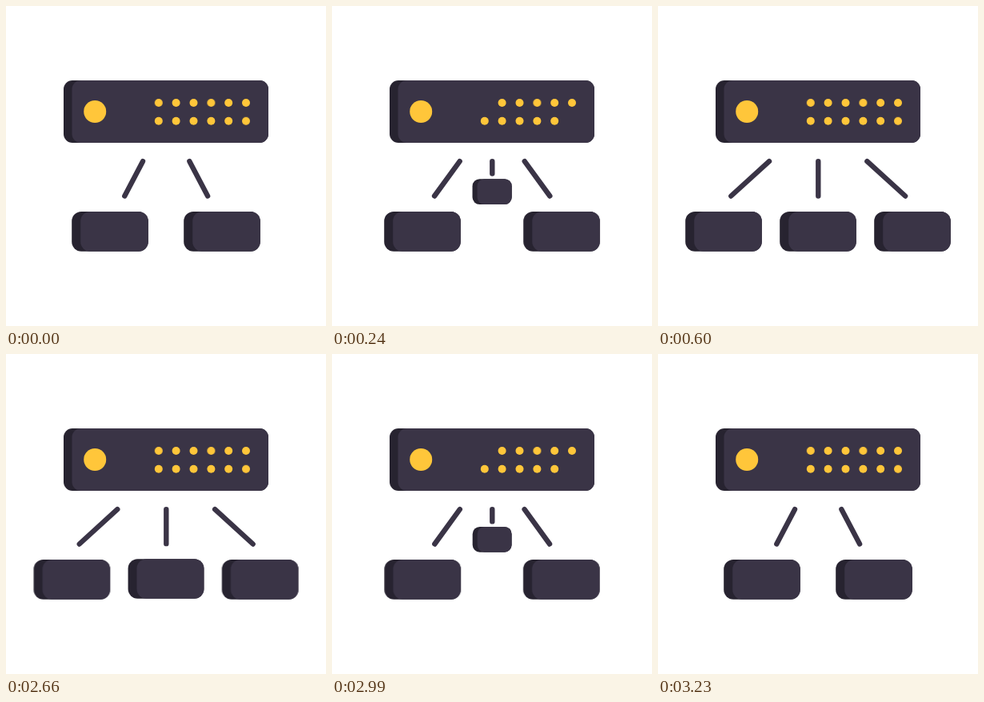
An HTML page without scripts that plays this animation: 400x400 px, repeating every 4260 ms.

```html
<!DOCTYPE html>
<html lang="en">
<head>
<meta charset="utf-8">
<title>Server and nodes</title>
<style>
  html, body { margin: 0; width: 100%; height: 100%; overflow: hidden; background: #fff; }
  svg { display: block; width: 100%; height: 100%; }

  .shade { fill: #272330; }
  .face { fill: #3a3446; }
  .lamp { fill: #ffc63a; }
  .wire { fill: none; stroke: #3a3446; stroke-width: 6.4; stroke-linecap: round; }

  .left, .right, .side, .stem, .mid, .blink-a, .blink-b, .extra {
    animation: 4260ms linear infinite;
  }

  /* Spread 0-600 ms, hold, close 2630-3230 ms, hold */
  .left { animation-name: left; }
  .right { animation-name: right; }
  @keyframes left {
    0%, 75.822%, 100% { transform: translateX(0); animation-timing-function: cubic-bezier(.333, 0, .667, 1); }
    14.085%, 61.737% { transform: translateX(-48px); animation-timing-function: cubic-bezier(.333, 0, .667, 1); }
  }
  @keyframes right {
    0%, 75.822%, 100% { transform: translateX(0); animation-timing-function: cubic-bezier(.333, 0, .667, 1); }
    14.085%, 61.737% { transform: translateX(48px); animation-timing-function: cubic-bezier(.333, 0, .667, 1); }
  }

  .side { animation-name: side; }
  @keyframes side {
    0%, 75.822%, 100% { d: path("M171 194.2L148.3 237.5"); animation-timing-function: cubic-bezier(.333, 0, .667, 1); }
    14.085%, 61.737% { d: path("M139 194.2L91.3 237.5"); animation-timing-function: cubic-bezier(.333, 0, .667, 1); }
  }

  .stem { animation-name: stem; }
  @keyframes stem {
    0%, 75.822%, 100% { d: path("M200.3 194.2L200.3 194.3"); animation-timing-function: cubic-bezier(.333, 0, .667, 1); }
    14.085%, 61.737% { d: path("M200.3 194.2L200.3 237.5"); animation-timing-function: cubic-bezier(.333, 0, .667, 1); }
  }

  /* Middle node grows while it drops; closing mirrors the opening curve */
  .mid.shade { animation-name: mid-shade; }
  .mid.face { animation-name: mid-face; }
  @keyframes mid-shade {
    0%, 75.822%, 100% { x: 187.2px; y: 195.8px; width: 26px; height: 23px; rx: 7.5px; animation-timing-function: cubic-bezier(.333, 0, .72, 1); }
    14.085%, 61.737% { x: 152.2px; y: 256.9px; width: 95.6px; height: 49.8px; rx: 12px; animation-timing-function: cubic-bezier(.28, 0, .667, 1); }
  }
  @keyframes mid-face {
    0%, 75.822%, 100% { x: 190.7px; y: 195.8px; width: 22.5px; height: 23px; rx: 7.5px; animation-timing-function: cubic-bezier(.333, 0, .72, 1); }
    14.085%, 61.737% { x: 163.2px; y: 256.9px; width: 84.6px; height: 49.8px; rx: 12px; animation-timing-function: cubic-bezier(.28, 0, .667, 1); }
  }

  /* Hard switches */
  .extra { animation-name: extra; animation-timing-function: step-end; }
  @keyframes extra {
    0%, 75.82%, 100% { opacity: 0; }
    .7% { opacity: 1; }
  }
  .blink-a { animation-name: blink-a; animation-timing-function: step-end; }
  @keyframes blink-a {
    0%, 10.56%, 75.82%, 100% { opacity: 1; }
    .7%, 65.96% { opacity: 0; }
  }
  .blink-b { animation-name: blink-b; animation-timing-function: step-end; }
  @keyframes blink-b {
    0%, 11.97%, 68.77%, 100% { opacity: 1; }
    7.74%, 64.55% { opacity: 0; }
  }
</style>
</head>
<body>
<svg viewBox="0 0 400 400">
  <defs>
    <g id="node">
      <rect class="shade" y="256.9" width="95.6" height="49.8" rx="12"/>
      <rect class="face" x="11" y="256.9" width="84.6" height="49.8" rx="12"/>
    </g>
    <circle id="dot" class="lamp" r="5"/>
  </defs>

  <!-- Server -->
  <rect class="shade" x="72" y="93" width="256" height="78" rx="11"/>
  <rect class="face" x="82.5" y="93" width="245.5" height="78" rx="11"/>
  <circle class="lamp" cx="111.2" cy="132" r="14"/>
  <g transform="translate(190.8 121)">
    <use href="#dot" class="blink-a"/>
    <use href="#dot" x="21.8"/>
    <use href="#dot" x="43.7"/>
    <use href="#dot" x="65.6" class="blink-b"/>
    <use href="#dot" x="87.4"/>
    <use href="#dot" x="109.2"/>
  </g>
  <g transform="translate(190.8 143.8)">
    <use href="#dot"/>
    <use href="#dot" x="21.8"/>
    <use href="#dot" x="43.7"/>
    <use href="#dot" x="65.6"/>
    <use href="#dot" x="87.4"/>
    <use href="#dot" x="109.2" class="blink-a"/>
  </g>

  <!-- Wires -->
  <path class="wire side" d="M171 194.2L148.3 237.5"/>
  <g transform="translate(400.4) scale(-1 1)">
    <path class="wire side" d="M171 194.2L148.3 237.5"/>
  </g>

  <!-- Nodes -->
  <g class="extra">
    <path class="wire stem" d="M200.3 194.2L200.3 194.3"/>
    <rect class="mid shade"/>
    <rect class="mid face"/>
  </g>
  <g class="left"><use href="#node" x="82.2"/></g>
  <g class="right"><use href="#node" x="222.2"/></g>
</svg>
</body>
</html>
```
